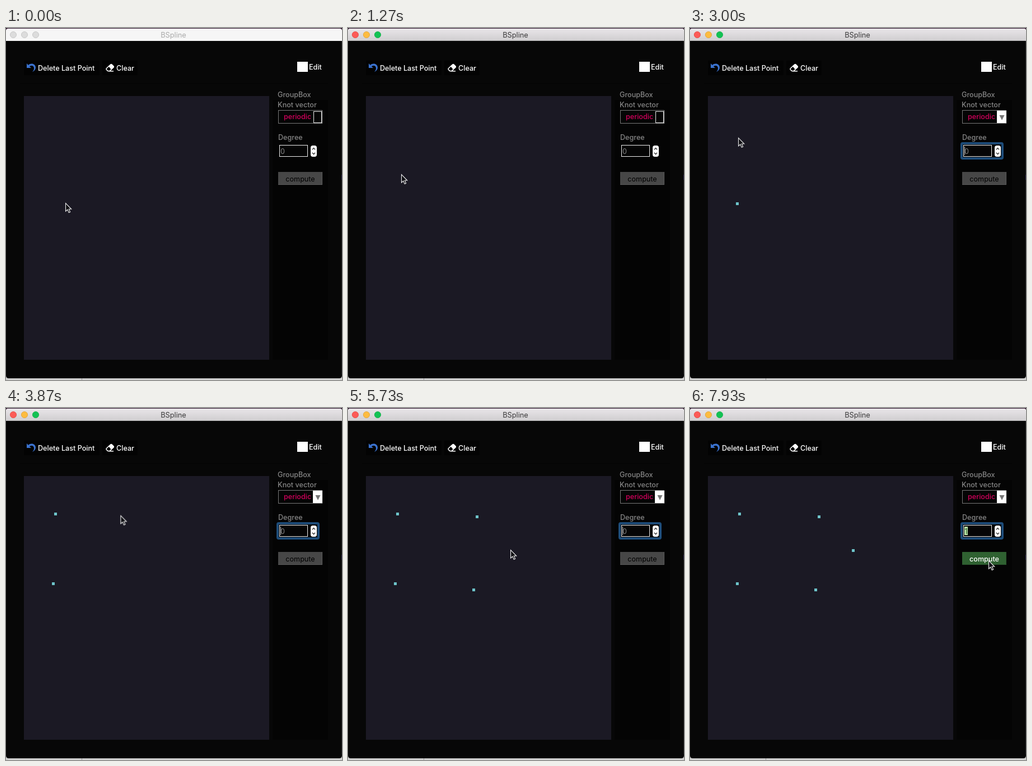
An HTML page for the animation above (8000 ms loop, 600 px wide and 626 px high).

```html
<!DOCTYPE html>
<html lang="en">
<head>
<meta charset="utf-8">
<title>BSpline</title>
<style>
html, body { margin: 0; width: 100%; height: 100%; overflow: hidden; background: #060606; }
svg { display: block; width: 600px; height: 626px; }
text { font: 400 12.6px Inter, "Open Sans", sans-serif; }
.bold { font-weight: 500; fill: #fff; }
.label { font-weight: 500; fill: #858585; }
.mid { text-anchor: middle; }
.title { font-size: 12.8px; }

/* Parts that switch on at a set moment and stay until the loop restarts */
.on { animation: 8s step-end infinite; }
.active { animation-name: active; }
.focus { animation-name: focus; }
.p1 { animation-name: p1; }
.p2 { animation-name: p2; }
.p3 { animation-name: p3; }
.p4 { animation-name: p4; }
.p5 { animation-name: p5; }
.value { animation-name: value; }
.hover { animation-name: hover; }
@keyframes active { 0% { opacity: 0 } 11.63%, to { opacity: 1 } }
@keyframes focus { 0% { opacity: 0 } 19.13%, to { opacity: 1 } }
@keyframes p1 { 0% { opacity: 0 } 28.4%, to { opacity: 1 } }
@keyframes p2 { 0% { opacity: 0 } 40.8%, to { opacity: 1 } }
@keyframes p3 { 0% { opacity: 0 } 51.6%, to { opacity: 1 } }
@keyframes p4 { 0% { opacity: 0 } 62.5%, to { opacity: 1 } }
@keyframes p5 { 0% { opacity: 0 } 74.1%, to { opacity: 1 } }
@keyframes value { 0% { opacity: 0 } 92.5%, to { opacity: 1 } }
@keyframes hover { 0% { opacity: 0 } 97.4%, to { opacity: 1 } }

.caret { animation: blink 1s -.47s step-end infinite; }
@keyframes blink { 0% { opacity: 1 } 50%, to { opacity: 0 } }

.pointer { animation: travel 8s linear infinite; }
@keyframes travel {
  0%, 4% { transform: translate(106px, 311px); }
  11.6% { transform: translate(101px, 285px); }
  15.88% { transform: translate(95px, 260px); animation-timing-function: ease-in-out; }
  25%, 32% { transform: translate(84px, 310px); }
  33.4% { transform: translate(84px, 303px); }
  37.5% { transform: translate(86px, 195px); }
  39%, 42% { transform: translate(87px, 187px); }
  44.13% { transform: translate(110px, 186px); }
  49.5%, 53% { transform: translate(229px, 192px); }
  57.5% { transform: translate(228px, 281px); }
  60.5%, 65% { transform: translate(223px, 321px); }
  68% { transform: translate(253px, 290px); }
  71.63%, 75% { transform: translate(290px, 252px); animation-timing-function: ease-in-out; }
  86% { transform: translate(548px, 209px); }
  89.13%, 93.5% { transform: translate(551px, 211px); }
  95.9% { transform: translate(545px, 240px); }
  99.13%, to { transform: translate(533px, 271px); }
}
</style>
</head>
<body>
<svg viewBox="0 0 600 626">
  <defs>
    <linearGradient id="bar" x2="0" y2="1">
      <stop stop-color="#e9e6e9"/><stop offset="1" stop-color="#cfcdcf"/>
    </linearGradient>
    <rect id="dot" x="-2.5" y="-2.5" width="5" height="5" fill="#6dc3c9"/>
  </defs>

  <!-- Window -->
  <rect width="600" height="626" fill="#cfcfcf"/>
  <path d="M135.5 622v4" stroke="#999"/>
  <rect width="600" height="30" fill="#2b1029"/>
  <path d="M0 20H600V618Q600 623 595 623H5Q0 623 0 618Z" fill="#070707"/>
  <path d="M599.5 23V616" stroke="#1c1c1c"/>
  <path d="M599.5 261v9" stroke="#2d2850"/>

  <!-- Title bar -->
  <path id="head" d="M0 23V5Q0 1 4 1H596Q600 1 600 5V23Z" fill="#f6f6f6"/>
  <g fill="#dcdcdc" stroke="#c8c8c8">
    <circle cx="13" cy="12" r="5.5"/><circle cx="33" cy="12" r="5.5"/><circle cx="53" cy="12" r="5.5"/>
  </g>
  <text class="title mid" x="299" y="17" fill="#aaa">BSpline</text>
  <g class="on active">
    <path d="M0 23V5Q0 1 4 1H596Q600 1 600 5V23Z" fill="url(#bar)"/>
    <path d="M0 22.5H600" stroke="#b5b3b5"/>
    <circle cx="13" cy="12" r="5.6" fill="#fc5b57" stroke="#e2443f" stroke-width=".8"/>
    <circle cx="33" cy="12" r="5.6" fill="#fdbc40" stroke="#dfa035" stroke-width=".8"/>
    <circle cx="53" cy="12" r="5.6" fill="#13c254" stroke="#0fae45" stroke-width=".8"/>
    <text class="title mid" x="299" y="17" fill="#3c3b3c">BSpline</text>
  </g>

  <!-- Toolbar -->
  <path d="M32 58H167V84H32ZM172 58H235V84H172Z" fill="#030303"/>
  <path d="M25 98.5H575" stroke="#030303"/>
  <path d="M37 63V71H45L42 68.3C46 65.4 50 67.2 50 71.5C50 74 49 76 47 78.3C51 76.3 53 73.4 53 70.3C52.5 63.5 45 61.5 39.7 66Z" fill="#3a72cf"/>
  <text class="bold" x="57" y="76">Delete Last Point</text>
  <g stroke="#fff" stroke-width="1.5" stroke-linejoin="round">
    <path d="M184 67.5L187 64.8Q188 64 189 65L192 68Q192.8 69 192 70L188.5 73.3Z" fill="#fff"/>
    <path d="M184 67.5L179.3 72Q178.5 73 179.3 74L182 76.6H185.2L188.5 73.3ZM183 76.8H192" fill="none"/>
  </g>
  <text class="bold" x="197" y="76">Clear</text>
  <rect x="520" y="60" width="19" height="18" fill="#fff"/>
  <text class="bold" x="541" y="74">Edit</text>

  <!-- Drawing area -->
  <rect x="32" y="121" width="438" height="469" fill="#1b1924"/>
  <g class="on p1"><use href="#dot" x="84.5" y="312.5"/></g>
  <g class="on p2"><use href="#dot" x="88.5" y="188.5"/></g>
  <g class="on p3"><use href="#dot" x="230.5" y="193.5"/></g>
  <g class="on p4"><use href="#dot" x="224.5" y="323.5"/></g>
  <g class="on p5"><use href="#dot" x="291.5" y="253.5"/></g>

  <!-- Side panel -->
  <rect x="476" y="128" width="99" height="462" fill="#040404"/>
  <text class="label" x="485" y="123">GroupBox</text>
  <text class="label" x="485" y="141">Knot vector</text>
  <rect x="486.5" y="146.5" width="78" height="23" fill="#050505" stroke="#777"/>
  <text x="496" y="162" fill="#d3005c" style="font-weight:500">periodic</text>
  <rect x="544" y="148" width="20" height="21" fill="#050505"/>
  <rect x="549.5" y="148.5" width="14" height="20" fill="#050505" stroke="#eee"/>
  <path d="M564.5 147V170" stroke="#999"/>

  <text class="label" x="486" y="199">Degree</text>
  <rect x="488.5" y="208.5" width="50" height="20" fill="#050505" stroke="#eee"/>
  <text x="490" y="223.5" fill="#858585">0</text>

  <g class="on focus">
    <rect x="548" y="147" width="17" height="22" fill="#fff"/>
    <path d="M552.5 155H561.5L557 164Z" fill="#777"/>
    <rect x="485" y="205" width="73" height="27" rx="2" fill="none" stroke="#1d4c79" stroke-width="4"/>
    <path class="caret" d="M490.5 211V226" stroke="#aaa"/>
  </g>

  <rect x="544" y="209" width="11" height="20" rx="4" fill="#fff"/>
  <path d="M547 216.3L549.5 213.5L552 216.3M547 221.7L549.5 224.5L552 221.7" fill="none" stroke="#333" stroke-width="1.3"/>

  <g class="on value">
    <rect x="489" y="209" width="49" height="19" fill="#050505"/>
    <rect x="490" y="211" width="6" height="15" fill="#b5e3a4"/>
    <text x="490.5" y="223.5" fill="#234a20">1</text>
  </g>

  <rect x="486" y="256" width="79" height="23" fill="#474747"/>
  <path d="M486 278.5H564.5V256" fill="none" stroke="#5a5a5a"/>
  <text class="mid" x="525.5" y="273">compute</text>
  <g class="on hover">
    <rect x="486" y="256" width="79" height="23" fill="#2f6131"/>
    <path d="M486 278.5H564.5V256" fill="none" stroke="#27502a"/>
    <text class="bold mid" x="525.5" y="273">compute</text>
  </g>

  <path class="pointer" d="M.5 .5V15L3.8 12L6.2 17.3L8.6 16.2L6.3 11H10.7Z" fill="#101014" stroke="#eee" stroke-width="1.1"/>
</svg>
</body>
</html>
```
